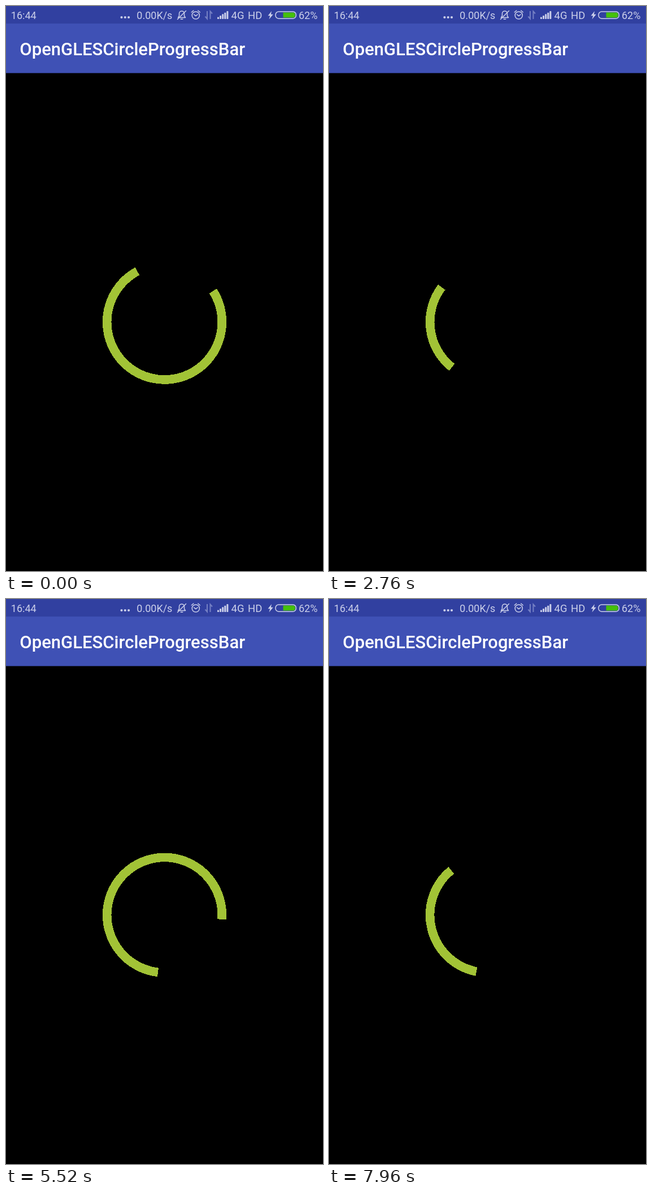
These frames come from a looping animation (561 by 998 pixels, 8000 ms). An HTML page:

```html
<!DOCTYPE html>
<html lang="en">
<head>
<meta charset="utf-8">
<title>Circle progress bar</title>
<style>
  html, body { margin: 0; width: 100%; height: 100%; overflow: hidden; background: #000; }
  svg { display: block; width: 100vw; height: 100vh; }
  text { font-family: Roboto, sans-serif; }
  .status { font-size: 18px; fill: #ccd0ea; }
  .network { font-size: 18.5px; }
  .title { font-size: 31.04px; font-weight: 500; fill: #fff; }
  .line { fill: none; stroke: #ccd0ea; stroke-width: 1.5; stroke-linecap: round; stroke-linejoin: round; }
  .solid { fill: #ccd0ea; }
</style>
</head>
<body>
<svg viewBox="0 0 561 998">
  <rect width="561" height="998" fill="#000"/>
  <rect width="561" height="118.5" fill="#3f51b5"/>
  <rect width="561" height="31" fill="#3140a0"/>

  <g class="status">
    <text x="8.8" y="22.5">16:44</text>
    <text x="231.3" y="22.5">0.00K/s</text>
    <text class="network" x="398.6" y="22.5">4G</text>
    <text class="network" x="428" y="22.5">HD</text>
    <text x="518" y="22.5">62%</text>
  </g>

  <g class="solid">
    <circle cx="204.5" cy="20" r="2.1"/>
    <circle cx="210.8" cy="20" r="2.1"/>
    <circle cx="217.1" cy="20" r="2.1"/>
  </g>

  <!-- muted bell -->
  <g class="line">
    <path d="M304.5 20.5H317.5L315.5 17.5V13.5C315.5 7.5 306.5 7.5 306.5 13.5V17.5Z"/>
    <path d="M309.3 23.2H312.7M303.5 23.5L318.5 8.5"/>
  </g>

  <!-- alarm clock -->
  <g class="line">
    <circle cx="335.8" cy="16.5" r="6.6"/>
    <path d="M332.6 15L335.8 17.6L339.2 15M328.3 11L331.8 8M343.3 11L339.8 8"/>
  </g>

  <!-- data arrows -->
  <path d="M356 9V22.5L352.5 18.5M361.5 23V9.5L365 13.5" fill="none" stroke="#7580c4" stroke-width="2"/>

  <g class="solid" id="signal"></g>

  <path class="solid" d="M470 9L463.5 17.3H467.3L465.5 23.5L472.8 14.8H468.8Z"/>

  <!-- battery -->
  <rect class="line" x="477" y="10" width="36.3" height="12.2" rx="5.5"/>
  <path d="M490.5 11.6H508.5Q511.7 11.6 511.7 16.1T508.5 20.6H490.5Z" fill="#45c00c"/>

  <text class="title" x="24.3" y="87">OpenGLESCircleProgressBar</text>

  <path id="arc" fill="none" stroke="#a2c336" stroke-width="15.6" shape-rendering="crispEdges"/>
</svg>
<script>
  const LOOP = 8000, STEP = 40;
  const CX = 280.5, CY = 558.2, R = 101.8;

  const START = 57.5, SPIN = 0.361;     // degrees, degrees per ms
  const MIN = 30, MAX = 330;            // arc length in degrees
  const HALF = 2790, PEAK = 518;        // ms to grow or shrink, time of the longest arc
  const DRIFT = 4;                      // slow wander of the spin, degrees

  const arc = document.getElementById('arc');

  document.getElementById('signal').innerHTML = [0, 1, 2, 3, 4].map(i => {
    const h = 3.5 + i * 2.6;
    return `<rect x="${374 + i * 4.1}" y="${23 - h}" width="3" height="${h}" rx="0.8"/>`;
  }).join('');

  // The head runs ahead while the arc grows, then the tail catches up.
  function anglesAt(t) {
    const spin = START + SPIN * t + DRIFT * Math.sin(2 * Math.PI * t / LOOP);
    const phase = (t - PEAK) / HALF + 1;
    const cycle = Math.floor(phase / 2);
    const local = phase - cycle * 2;
    const grown = Math.min(local, 1), shrunk = Math.max(local - 1, 0);
    const tail = spin + (MAX - MIN) * (cycle + shrunk);
    return [tail, tail + MIN + (MAX - MIN) * (grown - shrunk)];
  }

  function point(deg) {
    const r = deg * Math.PI / 180;
    return `${(CX + R * Math.sin(r)).toFixed(2)} ${(CY - R * Math.cos(r)).toFixed(2)}`;
  }

  function draw(time) {
    const t = Math.floor((time % LOOP) / STEP) * STEP;
    const [tail, head] = anglesAt(t);
    const large = head - tail > 180 ? 1 : 0;
    arc.setAttribute('d', `M${point(tail)}A${R} ${R} 0 ${large} 1 ${point(head)}`);
  }

  const start = performance.now();
  function tick() {
    draw(performance.now() - start);
    requestAnimationFrame(tick);
  }
  tick();
</script>
</body>
</html>
```
